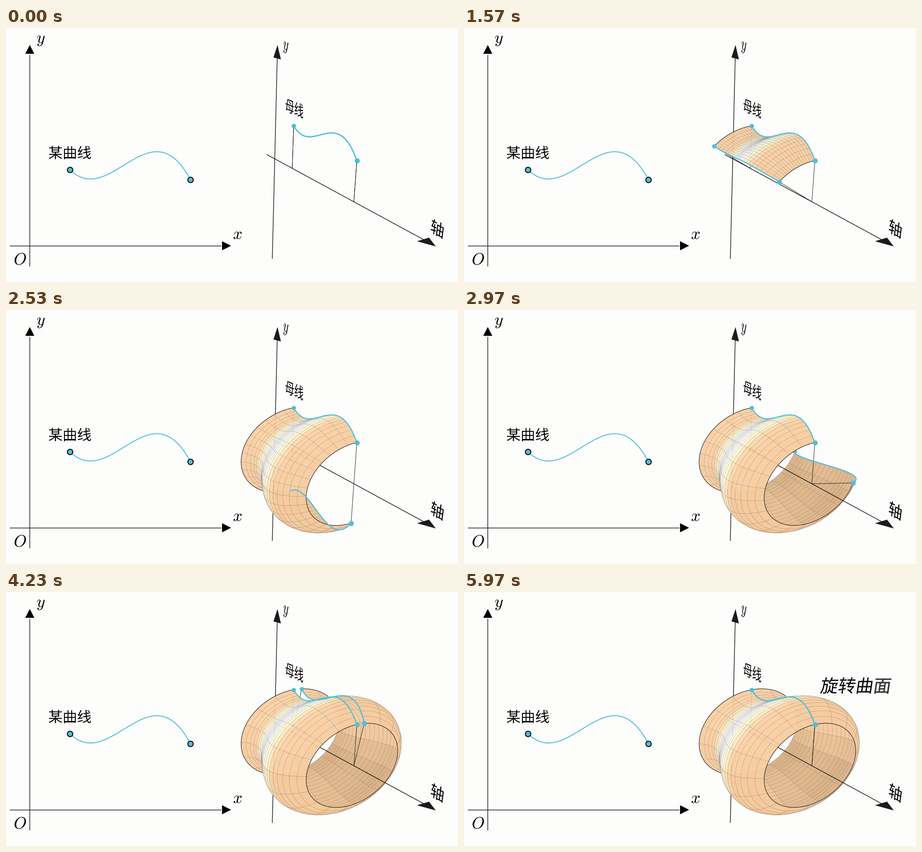
Write a matplotlib script that moves like this. It is 998 px wide and 561 px high and loops after 6010 ms.

```python
import numpy as np
import matplotlib.pyplot as plt
from matplotlib.animation import FuncAnimation
from matplotlib.collections import LineCollection, PolyCollection
from matplotlib.patches import PathPatch, Polygon
from matplotlib.path import Path
from matplotlib.textpath import TextPath

W, H, DPI = 998, 561, 64
PX = 72 / DPI                      # points per pixel
FRAMES, LOOP = 180, 6010
SPIN, WRITE = 150, 30              # frames for turning and for writing
BLUE, INK = "#4fbfda", "#111111"
CJK = {"family": "Noto Sans CJK JP"}
plt.rcParams["mathtext.fontset"] = "cm"

fig = plt.figure(figsize=(W / DPI, H / DPI), dpi=DPI, facecolor="#fdfdfc")
ax = fig.add_axes([0, 0, 1, 1])
ax.set_xlim(0, W)
ax.set_ylim(H, 0)
ax.axis("off")

# Camera: 70 degrees from the vertical, axis turned 30 degrees to the viewer
FOCAL = 1402.5
S7, C7 = np.sin(np.radians(70)), np.cos(np.radians(70))
S3, C3 = 0.5, np.sqrt(0.75)
BASIS = np.array([[S3, -C3 * C7, C3 * S7], [0, S7, C7], [C3, S3 * C7, -S3 * S7]])
ORIGIN = np.array([94.4, -8.5, 0])
EYE = np.array([0, 0, FOCAL])


def to_camera(x, y, z):
    x, y, z = np.broadcast_arrays(x, y, z)
    return np.stack([x, y, z], -1) @ BASIS + ORIGIN


def to_screen(p):
    k = FOCAL / (FOCAL - p[..., 2])
    return np.stack([W / 2 + k * p[..., 0], H / 2 - k * p[..., 1]], -1)


def project(x, y, z=0.0):
    return to_screen(to_camera(x, y, z))


# Profile curve, in pixels from the plane origin
X0, X1, UNIT = 89.0, 355.0, 88.7


def height(x):
    u = x - 134.3
    return 147.5 + 1.145e-4 * (73.35 * u ** 2 - u ** 3 / 3)


def revolve(x, angle):
    h = height(x)
    return to_camera(0.75 * x, 0.5625 * h * np.cos(angle), -0.75 * h * np.sin(angle))


def spun(x, angle):
    return to_screen(revolve(x, angle))


def smooth(t):
    s = lambda v: 1 / (1 + np.exp(-v))
    e = s(-5)
    return np.clip((s(10 * (np.clip(t, 0, 1) - 0.5)) - e) / (1 - 2 * e), 0, 1)


def line(pts, width, color=INK, z=1):
    pts = np.asarray(pts)
    return ax.plot(pts[:, 0], pts[:, 1], color=color, lw=width * PX, zorder=z,
                   solid_capstyle="butt", solid_joinstyle="round")[0]


def dot(p, size, z, edge=0):
    return ax.plot([p[0]], [p[1]], "o", ms=size * PX, mfc=BLUE, mec="black",
                   mew=edge * PX, zorder=z)[0]


def fill(pts, color=INK, z=2):
    ax.add_patch(Polygon(pts, closed=True, fc=color, lw=0, zorder=z))


def flat(cx, cy, skew=0.0):
    return lambda v: np.c_[cx + v[:, 0] + skew * v[:, 1], cy - v[:, 1]]


def in_plane(cx, cy):
    return lambda v: project(cx + v[:, 0], cy + v[:, 1])


def glyph(path, place, z=6):
    patch = PathPatch(Path(place(path.vertices), path.codes), fc="black", lw=0, zorder=z)
    return ax.add_patch(patch)


def math(text, em, place):
    path = TextPath((0, 0), f"${text}$", size=em)
    box = path.get_extents()
    centre = [(box.x0 + box.x1) / 2, (box.y0 + box.y1) / 2]
    glyph(Path(path.vertices - centre, path.codes), place)


def hanzi(text, em, place):
    n = len(text)
    return [glyph(TextPath(((k - n / 2) * em, -0.38 * em), c, size=em, prop=CJK), place)
            for k, c in enumerate(text)]


# Plane on the left
line([(52.5, 526), (52.5, 59)], 1.4)
line([(8, 481), (475, 481)], 1.4)
fill([(42.5, 57), (62.5, 57), (52.5, 37.5)], "black")
fill([(477, 471), (477, 491), (497, 481)], "black")
math("y", 36.5, flat(77, 28.5))
math("x", 36.5, flat(511.5, 458))
math("O", 36.5, flat(31.5, 510))
hanzi("某曲线", 31.8, flat(141, 275))
xs = np.linspace(X0, X1, 90)
line(np.c_[52 + xs, 481 - height(xs)], 2, BLUE, 3)
for x in (X0, X1):
    dot((52 + x, 481 - height(x)), 12, 4, 2)

# Space on the right
line(project(0, np.array([-250, 235.0])), 1.4)
line(project(np.array([-33, 450.0]), 0), 1.4, z=4)
fill([(599.5, 37.5), (590.5, 65), (607, 69.5)], "#1b1b1b")
fill([(949, 482.5), (907.5, 471), (934, 463)], "#1b1b1b", 4)
math("y", 37, in_plane(30, 251))
hanzi("母线", 32.5, in_plane(66.5, 132.5))
hanzi("轴", 28.5, in_plane(466, 31))
line(spun(xs, 0), 2.4, BLUE, 8)
dot(spun(X0, 0), 9.5, 9)
dot(spun(X1, 0), 11, 9)


def spoke(x, angle):
    return np.array([project(0.75 * x, 0.0), spun(x, angle)])


line(spoke(X0, 0), 0.9, z=2)
line(spoke(X1, 0), 0.9, z=7)

# Turning parts
back_spoke = line(spoke(X0, 0), 0.9, z=2)
front_spoke = line(spoke(X1, 0), 0.9, z=7)
sweep = line(spun(xs, 0), 2.4, BLUE, 8)
back_dot = dot(spun(X0, 0), 9.5, 9)
front_dot = dot(spun(X1, 0), 11, 9)
rim_front = line(spun(X1, np.zeros(2)), 1, z=6)
rim_back = line(spun(X0, np.zeros(2)), 1, z=6)
rim_far = line(spun(X0, np.zeros(2)), 1, z=6)
far_side = ax.add_collection(PolyCollection([], zorder=3))
near_side = ax.add_collection(PolyCollection([], zorder=5))

NU, NV, SUB = 24, 16, 5
GRID = np.linspace(X0, X1, NU + 1)
MID = (GRID[1:] + GRID[:-1]) / 2
WHITE, YELLOW, ORANGE = np.array([(253, 252, 250), (254, 247, 208), (246, 203, 158)]) / 255
OFFSET = np.abs(MID / UNIT - 2.42)
TINT = np.stack([np.interp(OFFSET, [0.35, 0.62, 0.95], c)
                 for c in zip(WHITE, YELLOW, ORANGE)], -1)
LIGHT = np.array([-0.5, 0.6, 0.62])
FACING = 57                        # angle of the side nearest the viewer


def surface(turn):
    pts = revolve(GRID[:, None], np.linspace(0, turn, NV * SUB + 1)[None, :])
    flat_pts = to_screen(pts)
    corner = pts[:, ::SUB]
    a, b = corner[:-1, :-1], corner[1:, 1:]
    c, d = corner[1:, :-1], corner[:-1, 1:]
    normal = np.cross(d - c, b - a)
    normal /= np.linalg.norm(normal, axis=-1, keepdims=True) + 1e-9
    to_eye = EYE - (a + b + c + d) / 4
    outside = np.sum(normal * to_eye, -1, keepdims=True) > 0
    lit = (normal @ LIGHT)[..., None] ** 3
    rgb = np.where(outside, TINT[:, None], ORANGE)
    rgb = np.clip(rgb + np.where(lit > 0, 0.03, 0.12) * lit, 0, 1)
    rgba = np.concatenate([rgb, np.full(rgb.shape[:2] + (1,), 0.95)], -1)
    depth = np.linalg.norm(to_eye, axis=-1)
    angle = np.degrees(turn) * (np.arange(NV) + 0.5) / NV
    near = np.abs((angle - FACING + 180) % 360 - 180) < 90
    layers = {True: ([], []), False: ([], [])}
    for n in np.argsort(-depth, axis=None):
        i, j = divmod(n, NV)
        cut = slice(j * SUB, (j + 1) * SUB + 1)
        verts, cols = layers[bool(near[j])]
        verts.append(np.concatenate([flat_pts[i, cut], flat_pts[i + 1, cut][::-1]]))
        cols.append(rgba[i, j])
    return layers


def show(coll, verts, cols):
    coll.set_verts(verts)
    if cols:
        coll.set_facecolor(cols)
        coll.set_edgecolor((0.36, 0.32, 0.32, 0.45))
        coll.set_linewidth(0.45 * PX)


# Title that is written stroke first, then filled
title = hanzi("旋转曲面", 39, flat(865.5, 206.5, 0.15))
outlines = [p.get_path().to_polygons(closed_only=False) for p in title]
pens = [ax.add_collection(LineCollection([], colors="black", zorder=6)) for _ in title]


def partial(polys, share):
    left, out = int(share * sum(map(len, polys))), []
    for p in polys:
        if left < 2:
            break
        out.append(p[:left])
        left -= len(p)
    return out


def write(w):
    lag = 0.2
    for k, (patch, polys, pen) in enumerate(zip(title, outlines, pens)):
        p = np.clip((1 + lag * (len(title) - 1)) * w - lag * k, 0, 1)
        q = max(0.0, 2 * p - 1)
        patch.set_alpha(q)
        pen.set_segments(partial(polys, min(1, 2 * p)) if 0 < p < 1 else [])
        pen.set_linewidth(1.4 * (1 - q) * PX)


def draw(i):
    turn = 2 * np.pi * smooth(i / SPIN)
    deg = np.degrees(turn)
    layers = surface(turn) if i > 0 else {True: ([], []), False: ([], [])}
    show(near_side, *layers[True])
    show(far_side, *layers[False])

    sweep.set_data(*spun(xs, turn).T)
    back_spoke.set_data(*spoke(X0, turn).T)
    front_spoke.set_data(*spoke(X1, turn).T)
    for mark, x in ((back_dot, X0), (front_dot, X1)):
        u, v = spun(x, turn)
        mark.set_data([u], [v])
    back_dot.set_zorder(2.5 if 147 < deg < 308 else 9)

    rim_front.set_data(*spun(X1, np.linspace(0, turn, 120)).T)
    rim_back.set_data(*spun(X0, np.radians(np.linspace(0, min(deg, 145), 70))).T)
    rim_far.set_data(*spun(X0, np.radians(np.linspace(314, max(deg, 314), 30))).T)
    write(np.clip((i - SPIN) / WRITE, 0, 1))
    return []


anim = FuncAnimation(fig, draw, frames=FRAMES, interval=LOOP / FRAMES, repeat=True,
                     repeat_delay=0, blit=False)
plt.show()
```
